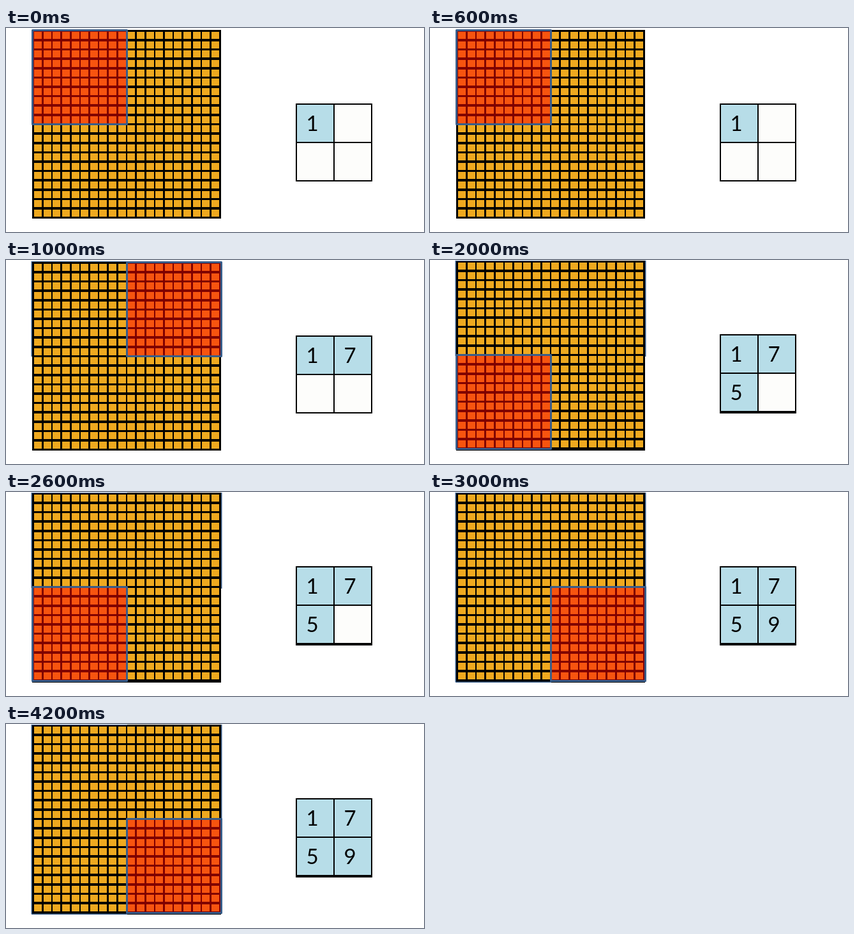
Write an HTML page with a canvas that moves like this. It is 655 px wide and 319 px high and loops after 5 s.

```html
<!DOCTYPE html>
<html lang="en">
<head>
<meta charset="utf-8">
<title>Pooling</title>
<style>
html, body { margin: 0; height: 100%; overflow: hidden; background: #fff; }
canvas { display: block; }
</style>
</head>
<body>
<canvas id="stage" width="655" height="319"></canvas>
<script>
const ctx = document.getElementById('stage').getContext('2d');
const LOOP = 5000, STEP_MS = 1000;
const CELLS = 20, PITCH = 14.63, HALF = 148;
const BLUE = '#385d8a', GOLD = '#efa91f', LIGHT = '#b7dde8';
const VALUES = [1, 7, 5, 9];

function box(color, x, y, w, h) {
  ctx.fillStyle = color;
  ctx.fillRect(x, y, w, h);
}

function drawGrid(step, lift) {
  box('#000', 41, 3 - lift, 296, 295 + lift);
  for (let row = 0; row < CELLS; row++) {
    for (let col = 0; col < CELLS; col++) {
      box(GOLD, Math.round(44 + col * PITCH), Math.round(6 - lift + row * PITCH), 12, 11);
    }
  }

  // Edges left behind by the earlier windows
  if (step > 0) {
    box(BLUE, 39.5, 2 - lift / 2, 1.5, step > 2 ? 296 : 149);
    box(BLUE, 40, 2 - lift / 2, 150, 1);
  }
  if (step > 1) box(BLUE, 337, 1, 1.5, 150);
  if (step > 2) box(BLUE, 40, 296.5, 150, 1.5);

  const x = 41.5 + (step % 2) * HALF;
  const y = step < 2 ? 3.5 : 148.5;
  box('rgba(255,0,0,.5)', x, y, HALF, 147);
  ctx.strokeStyle = BLUE;
  ctx.lineWidth = 3;
  ctx.lineJoin = 'round';
  ctx.strokeRect(x, y, HALF, 147);
}

function drawTable(step, lift) {
  const top = 118 - lift;
  box('#000', 454, top, 120, 122 + lift);
  ctx.font = '33px Lato, Carlito, sans-serif';
  ctx.textAlign = 'center';
  VALUES.forEach((value, i) => {
    const col = i % 2, row = i >> 1;
    const shown = i <= step;
    box(shown ? LIGHT : '#fdfdfb', 456 + col * 59, top + 2 + row * 60, col ? 57 : 57, row ? 58 : 58);
    if (!shown) return;
    ctx.fillStyle = '#000';
    ctx.fillText(value, 480 + col * 59, top + 43 + row * 60);
  });
}

function draw(now) {
  const step = Math.min(3, Math.floor((now % LOOP) / STEP_MS));
  const lift = step < 2 ? 0 : 2;
  box('#fff', 0, 0, 655, 319);
  drawGrid(step, lift);
  drawTable(step, lift);
}

const start = performance.now();
function tick() {
  draw(performance.now() - start);
  requestAnimationFrame(tick);
}
tick();
</script>
</body>
</html>
```
